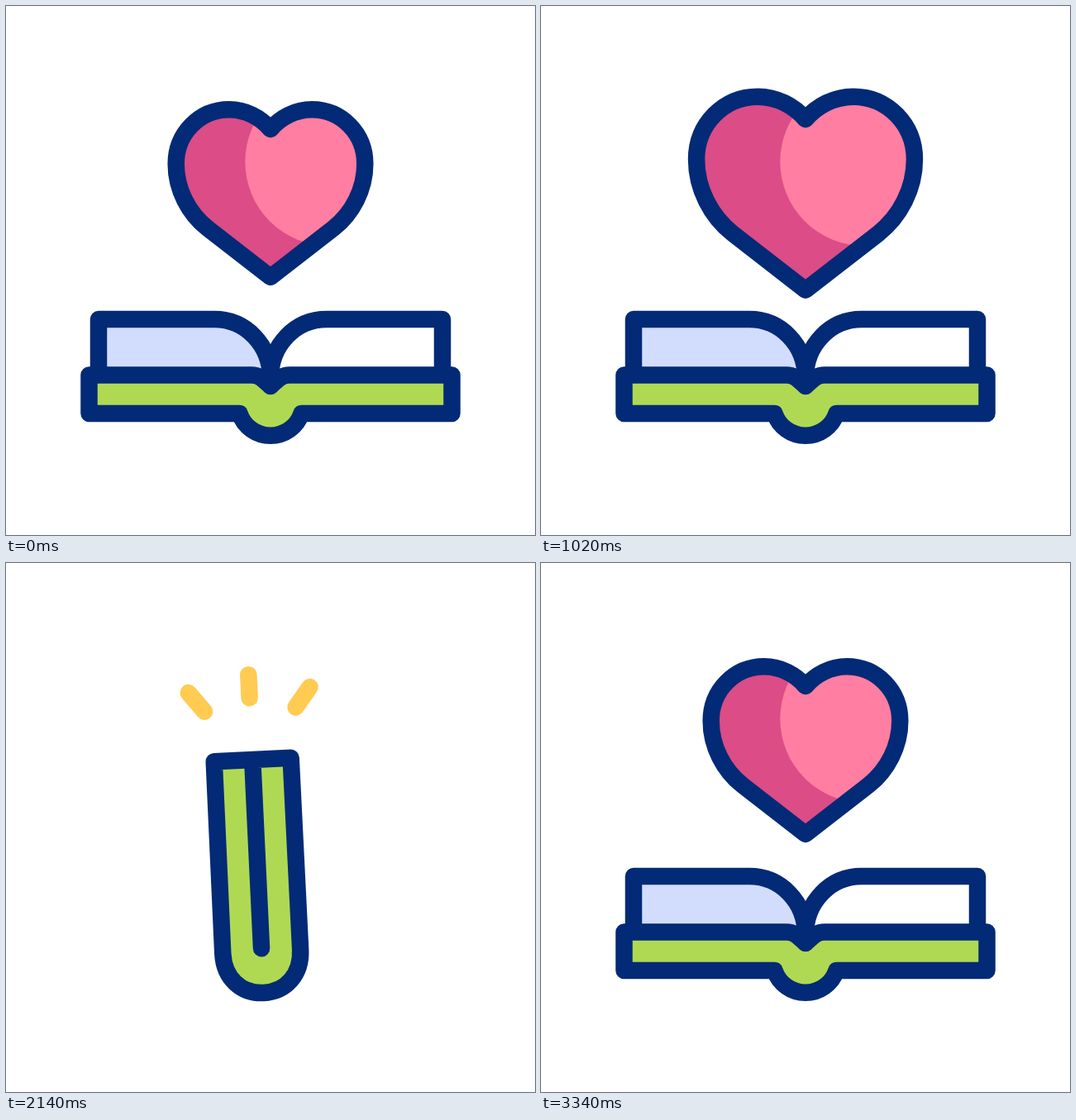
An HTML page with a canvas that plays this animation: 640 px wide and 640 px high, repeating every 3600 ms.

```html
<!DOCTYPE html>
<html lang="en">
<head>
<meta charset="utf-8">
<title>Book and heart</title>
<style>
  html, body { margin: 0; width: 100%; height: 100%; overflow: hidden; background: #fff; }
  canvas { display: block; width: 640px; height: 640px; }
</style>
</head>
<body>
<canvas id="stage"></canvas>
<script>
const LOOP = 3600, MID = 2038, CX = 320, LINE = 20.5;
const NAVY = '#032a76', GREEN = '#b0d953', BLUE = '#d2dcfd',
      ROSE = '#dc4c87', PINK = '#ff7ea1', YELLOW = '#ffcb51';

const canvas = document.getElementById('stage');
const ctx = canvas.getContext('2d');
const dpr = window.devicePixelRatio || 1;
canvas.width = canvas.height = 640 * dpr;

const clamp = v => Math.min(1, Math.max(0, v));
const lerp = (a, b, k) => a + (b - a) * k;
const mix = (p, q, k) => p.map((v, i) => lerp(v, q[i], k));
const smooth = (t, from, to) => {
  const x = clamp((t - from) / (to - from));
  return x * x * (3 - 2 * x);
};

// Monotone cubic curve through [time, value] keys, flat at both ends.
function curve(keys) {
  const n = keys.length;
  const d = keys.slice(1).map((k, i) => (k[1] - keys[i][1]) / (k[0] - keys[i][0]));
  const m = keys.map((_, i) =>
    i === 0 || i === n - 1 || d[i - 1] * d[i] <= 0 ? 0 : 2 * d[i - 1] * d[i] / (d[i - 1] + d[i]));
  return t => {
    if (t <= keys[0][0]) return keys[0][1];
    if (t >= keys[n - 1][0]) return keys[n - 1][1];
    let i = 0;
    while (t > keys[i + 1][0]) i++;
    const h = keys[i + 1][0] - keys[i][0], x = (t - keys[i][0]) / h, y = 1 - x;
    return keys[i][1] * (1 + 2 * x) * y * y + h * m[i] * x * y * y
         + keys[i + 1][1] * x * x * (3 - 2 * x) - h * m[i + 1] * x * x * y;
  };
}

const closing = curve([[1260, 0], [1380, 2.5], [1556, 6], [1612, 13],
                       [1660, 30.5], [1700, 53.7], [1750, 80], [1800, 90]]);
const sink = curve([[1365, 0], [1556, 28], [1700, 70], [1815, 118]]);
const rise = curve([[2290, 98], [2520, 44], [2750, 0]]);

// Opening is closing played backwards; the left half is a touch ahead in closing.
const foldAngle = (t, lead) => closing((t < MID ? t : 2 * MID - t) + lead);
const tilt = t => -3.7 * (t < 2060 ? smooth(t, 1640, 2060) : 1 - smooth(t, 2060, 2300));

function heartScale(t) {
  if (t < 400) return 1 + 0.2 * smooth(t, 40, 400);
  if (t < 800) return 1.2 - 0.2 * smooth(t, 400, 800);
  if (t < 1120) return 1 + 0.2 * smooth(t, 800, 1120);
  if (t > 2956) return 1.2 - 0.2 * smooth(t, 2956, 3335);
  const gap = t < MID ? t - 1120 : 2956 - t;
  return 1.2 - gap * gap * 2.071e-6;
}

function outline(fill) {
  ctx.fillStyle = fill;
  ctx.fill();
  ctx.stroke();
}

function drawHeart(t) {
  const s = heartScale(t);
  if (s <= 0.2) return;
  const cy = 226.6 + (t < MID ? sink(t) : rise(t));
  const x = v => CX + v * s, y = v => cy + (v - 226.6) * s;
  const bez = (a, b, c, d, e, f) => ctx.bezierCurveTo(x(a), y(b), x(c), y(d), x(e), y(f));

  ctx.beginPath();
  ctx.moveTo(x(0), y(149));
  bez(-12, 135, -30, 125.3, -50, 125.3);
  bez(-86, 125.3, -114.3, 154.5, -114.3, 191);
  bez(-114.3, 222, -99, 251, -76, 269);
  ctx.lineTo(x(0), y(328));
  ctx.lineTo(x(76), y(269));
  bez(99, 251, 114.3, 222, 114.3, 191);
  bez(114.3, 154.5, 86, 125.3, 50, 125.3);
  bez(30, 125.3, 12, 135, 0, 149);
  ctx.closePath();

  ctx.fillStyle = ROSE;
  ctx.fill();
  // The highlight stays put while the heart moves over it.
  const light = new Path2D();
  light.arc(391, 188.5, 101.7, 0, Math.PI * 2);
  ctx.save();
  ctx.clip();
  ctx.fillStyle = PINK;
  ctx.fill(light);
  ctx.restore();
  ctx.stroke();
}

// Page points along and across the cover: open, half closed, closed.
const PAGE = [
  [[188, -17], [197, -15], [185, -16.5]],
  [[188, -84], [203, -53], [185, -16.5]],
  [[48, -84], [81, -79], [110, -16.5]],
  [[10.5, -84], [51.5, -85], [80, -16.5]],
  [[-20, -53.6], [16.5, -65], [40, -16.5]]
];

// One half of the book; dir is -1 for left, 1 for right.
function half(deg, dir) {
  const a = deg * Math.PI / 180, cos = Math.cos(a), sin = Math.sin(a);
  const k1 = clamp(deg / 55), k2 = clamp((deg - 55) / 35);
  const at = (u, v) => [
    CX + dir * (20 - 3.5 * k2 + u * cos + v * sin),
    463 - 26 * k2 - u * sin + v * cos
  ];
  const side = (open, shut) => {
    const [x, y] = mix(open, shut, k2);
    return [CX + dir * x, y];
  };
  const slip = 26 * k1 * (1 - k1);
  const edge = lerp(-16.5 + 2.8 * k1, -16.5, k2);
  return {
    k2,
    page: PAGE.map(([open, mid, shut], i) => {
      const [u, v] = mix(mix(open, mid, k1), shut, k2);
      return at(i < 2 ? u - slip : u, v);
    }),
    top: at(199.5, edge),
    foot: at(199.5, 30),
    inner: at(3, edge),
    innerCtl: at(-7, edge),
    gutterCtl: side([9, 452], [0, 455]),
    neck: side([37.5, 493], [47, 470]),
    neckCtl: side([32, 509], [47, 500]),
    baseCtl: side([17, 519.8], [27, 519.8])
  };
}

function drawPage(h, fill) {
  const [p0, p1, p2, c1, c2] = h.page;
  ctx.beginPath();
  ctx.moveTo(...p0);
  ctx.lineTo(...p1);
  ctx.lineTo(...p2);
  ctx.bezierCurveTo(...c1, ...c2, CX, 450);
  outline(fill);
}

function drawCover(l, r) {
  const gutter = [CX, 460 + 3 * (l.k2 + r.k2)];
  ctx.beginPath();
  ctx.moveTo(...gutter);
  ctx.bezierCurveTo(...l.gutterCtl, ...l.innerCtl, ...l.inner);
  for (const p of [l.top, l.foot, l.neck]) ctx.lineTo(...p);
  ctx.bezierCurveTo(...l.neckCtl, ...l.baseCtl, CX, 519.8);
  ctx.bezierCurveTo(...r.baseCtl, ...r.neckCtl, ...r.neck);
  for (const p of [r.foot, r.top, r.inner]) ctx.lineTo(...p);
  ctx.bezierCurveTo(...r.innerCtl, ...r.gutterCtl, ...gutter);
  ctx.closePath();
  outline(GREEN);
}

// Rays grow outwards, then shrink towards their outer ends.
function drawSparks(t) {
  const head = smooth(t, 1790, 1980), tail = smooth(t, 2040, 2280);
  if (head <= 0 || tail >= 1) return;
  ctx.strokeStyle = YELLOW;
  for (const [from, to] of [[[-44, 191], [-73.5, 153]], [[0, 180], [0, 134.5]], [[44, 191], [73.5, 153]]]) {
    const a = mix(from, to, tail), b = mix(from, to, head);
    ctx.beginPath();
    ctx.moveTo(CX + a[0], a[1]);
    ctx.lineTo(CX + b[0], b[1]);
    ctx.stroke();
  }
}

function draw(t) {
  ctx.setTransform(dpr, 0, 0, dpr, 0, 0);
  ctx.fillStyle = '#fff';
  ctx.fillRect(0, 0, 640, 640);
  ctx.lineWidth = LINE;
  ctx.lineCap = ctx.lineJoin = 'round';
  ctx.strokeStyle = NAVY;

  drawHeart(t);

  ctx.translate(CX, 697);
  ctx.rotate(tilt(t) * Math.PI / 180);
  ctx.translate(-CX, -697);
  const left = half(foldAngle(t, 2.4), -1);
  const right = half(foldAngle(t, -2.4), 1);
  drawPage(left, BLUE);
  drawPage(right, '#fff');
  drawCover(left, right);
  drawSparks(t);
}

function tick() {
  draw(performance.now() % LOOP);
  requestAnimationFrame(tick);
}
tick();
</script>
</body>
</html>
```
